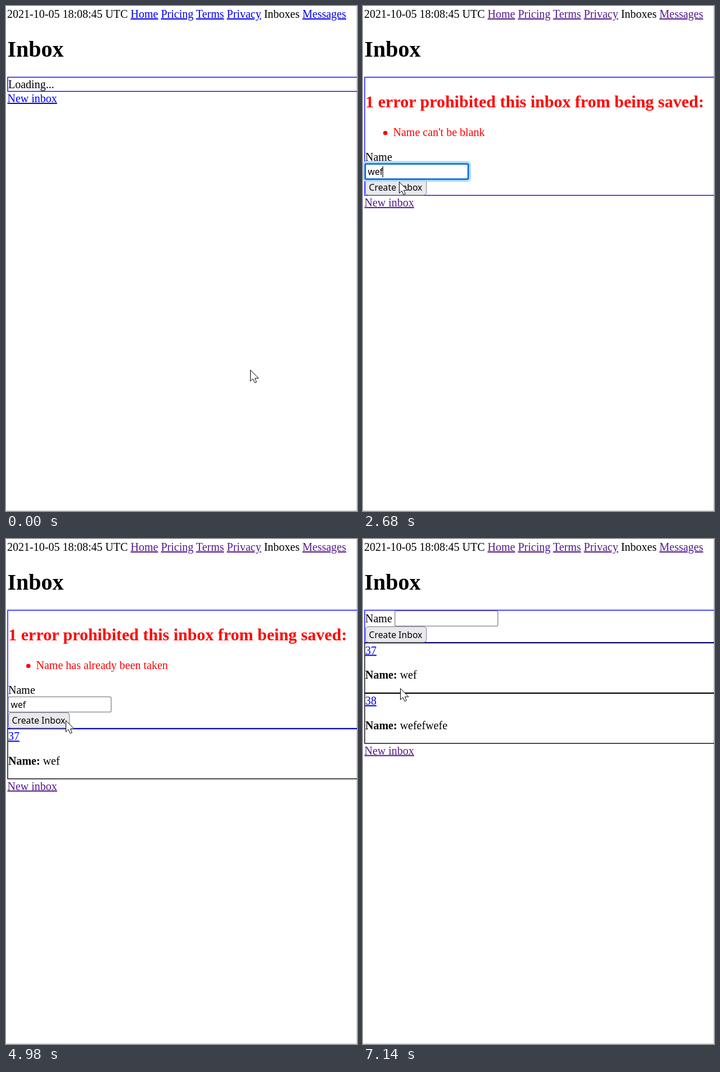
Animation of 624 by 897 pixels, one loop 7230 ms. Source, as an HTML page:

```html
<!DOCTYPE html>
<html lang="en">
<head>
<meta charset="utf-8">
<title>Inbox</title>
<style>
  html, body { margin: 0; width: 100%; height: 100%; overflow: hidden; background: #fff; }
  svg { display: block; width: 624px; height: 897px; font: 20px "Liberation Serif", "Times New Roman", serif; }
  .link { fill: #00e; text-decoration: underline; }
  .seen { fill: #551a8b; text-decoration: underline; }
  .ui { font: 15.75px "Noto Sans", sans-serif; }
  .bold { font-weight: bold; }
  .h1 { font-size: 40px; font-weight: bold; }
  .h2 { font-size: 30px; font-weight: bold; }
  .error { fill: red; }
</style>
</head>
<body>
<svg id="stage" viewBox="0 0 624 897"></svg>
<script>
const LOOP = 7230, TICKS = 87, STEP = LOOP / TICKS;
const VISITED = 2, LOADED = 6; // ticks when links turn purple and the form arrives
const REPLY = 3;               // ticks from a press to the server's answer
const SPEED = 2;               // letters typed per tick
const SHIFT = 152.6;           // height added by the error message
const ITEM = 89.6;             // height of one saved inbox

const stage = document.getElementById("stage");
const ruler = document.createElement("canvas").getContext("2d");
ruler.font = '15.75px "Noto Sans", sans-serif';

// Each round: click the field, type, press the button
const rounds = [
  { text: "", press: 18 },
  { text: "wef", focus: 29, type: 31, press: 36 },
  { text: "wef", focus: 46, type: 48, press: 53 },
  { text: "wefefwefe", focus: 65, type: 75, press: 79 }
];

// Pointer moves: first tick, last tick, place reached
const home = [434, 646];
const moves = [
  [8, 15, 62, 176], [21, 28, 70, 292], [29, 32, 64, 312], [32, 35, 64, 319],
  [40, 45, 85, 152], [49, 52, 86, 165], [57, 60, 106, 322], [60, 63, 78, 293],
  [68, 70, 78, 330], [77, 79, 48, 316], [85, 86, 66, 265]
];

const ease = u => u * u * (3 - 2 * u);

function pointerAt(k) {
  let [x, y] = home;
  for (const [from, to, px, py] of moves) {
    const e = ease(Math.min(1, Math.max(0, (k - from) / (to - from))));
    x += (px - x) * e;
    y += (py - y) * e;
  }
  return [x, y];
}

// Replays all rounds answered before tick k
function stateAt(k) {
  const saved = [];
  let error = "", kept = "", round = {};
  for (round of rounds) {
    if (k < round.press + REPLY) break;
    const name = round.text;
    error = !name ? "Name can't be blank" : saved.includes(name) ? "Name has already been taken" : "";
    if (!error) saved.push(name);
    kept = error ? name : "";
    round = {};
  }
  const letters = k >= round.type ? (k - round.type + 1) * SPEED : 0;
  const value = round.text ? round.text.slice(0, kept.length + letters) : kept;
  const shift = error ? SHIFT : 0;
  return {
    saved, error, value, shift,
    focused: k >= round.focus && k < round.press,
    pressed: k === round.press,
    field: error ? { x: 4, y: 280.4, w: 183, h: 27 } : { x: 56.7, y: 127.7, w: 183, h: 27 },
    button: { x: 4.5, y: 155.7 + shift, w: 108.3, h: 27.6 }
  };
}

const inside = ([x, y], b, inset = 0) =>
  x > b.x + inset && x < b.x + b.w - inset && y > b.y + inset && y < b.y + b.h - inset;

const text = (x, y, body, cls = "") => `<text x="${x}" y="${y}" class="${cls}">${body}</text>`;
const rect = (b, grow, r, fill, stroke, width) =>
  `<rect x="${b.x - grow}" y="${b.y - grow}" width="${b.w + 2 * grow}" height="${b.h + 2 * grow}"
    rx="${r}" fill="${fill}" stroke="${stroke}" stroke-width="${width}"/>`;
const frame = (top, bottom, color) =>
  rect({ x: 3, y: top, w: 640, h: bottom - top }, 0, 0, "none", color, 1.4);

function nav(cls) {
  const items = ["Home", "Pricing", "Terms", "Privacy", "Inboxes", "Messages"]
    .map(n => n === "Inboxes" ? n : `<tspan class="${cls}">${n}</tspan>`);
  return text(2.1, 21, "2021-10-05 18:08:45 UTC " + items.join(" "));
}

function field({ field: b, value, focused }) {
  const x = b.x + 4.5, label = text(x, b.y + 19.8, value, "ui");
  if (!focused) return rect(b, 0, 2.5, "#fff", "#83838f", 1.3) + label;
  const caret = x + ruler.measureText(value).width;
  return rect(b, 3, 5, "none", "#a9dcfa", 3.6) + rect(b, 0, 2, "#fff", "#0060df", 2.5) + label +
    `<path d="M${caret} ${b.y + 4}v20" stroke="#000" stroke-width="1.2"/>`;
}

function button({ button: b, pressed }, hovered) {
  const fill = pressed ? "#b1b1b9" : hovered ? "#d0d0d7" : "#e9e9ed";
  return rect(b, 0, 5, fill, hovered ? "#676774" : "#8f8f9d", 1.2) +
    text(10.6, b.y + 19.8, "Create Inbox", "ui");
}

function message(error) {
  return error && `<g class="error">
    ${text(4.3, 180, "1 error prohibited this inbox from being saved:", "h2")}
    <circle cx="39.7" cy="225.5" r="3.8"/>${text(53.5, 231, error)}</g>`;
}

function item(y, id, name) {
  return frame(y, y + ITEM - 0.8, "#000") + text(4, y + 20, id, "link") +
    text(4, y + 63.5, `<tspan class="bold">Name:</tspan> ${name}`);
}

function pointer([x, y], beam) {
  const shape = beam
    ? '<path d="M-6-9.5h4.5l1.5 1.5 1.5-1.5h4.5M0-8V8M-6 9.5h4.5l1.5-1.5 1.5 1.5h4.5" fill="none" stroke="#000" stroke-width="1.6"/>'
    : '<path d="M.5.5v20l4.5-4.2 3.1 7 3.2-1.4-2.8-6.7H15z" fill="#fff" stroke="#000"/>';
  return `<g transform="translate(${x.toFixed(1)} ${y.toFixed(1)})">${shape}</g>`;
}

function draw(k) {
  const state = stateAt(k), { saved, error, shift } = state;
  const link = k < VISITED ? "link" : "seen";
  const loading = k < LOADED;
  // Hover effects trail the pointer by one tick
  const before = pointerAt(k - 1);
  const hovered = inside(before, state.button);
  const beam = inside(before, state.field, 2);

  const items = saved.map((name, i) => item(184.6 + shift + i * ITEM, 37 + i, name)).join("");
  const box = frame(126.5, loading ? 151.6 : 183.8 + shift, "#00f");
  const content = loading
    ? text(4, 146, "Loading...")
    : message(error) + text(4, error ? 274.7 : 148, "Name") + button(state, hovered) + field(state);
  const newY = loading ? 171 : 203.5 + shift + saved.length * ITEM;

  stage.innerHTML =
    '<path d="M623.5 0V897M0 896.5H624" stroke="#ccc"/>' +
    nav(link) + text(2.5, 89.6, "Inbox", "h1") +
    (error ? items + box : box + items) + content +
    text(2.5, newY, "New inbox", link) +
    pointer(pointerAt(k), beam);
}

let shown = -1;
function tick() {
  const t = performance.now() % LOOP;
  const k = Math.min(TICKS - 1, Math.floor((t + 15) / STEP));
  if (k !== shown) draw(shown = k);
  requestAnimationFrame(tick);
}
tick();
</script>
</body>
</html>
```
